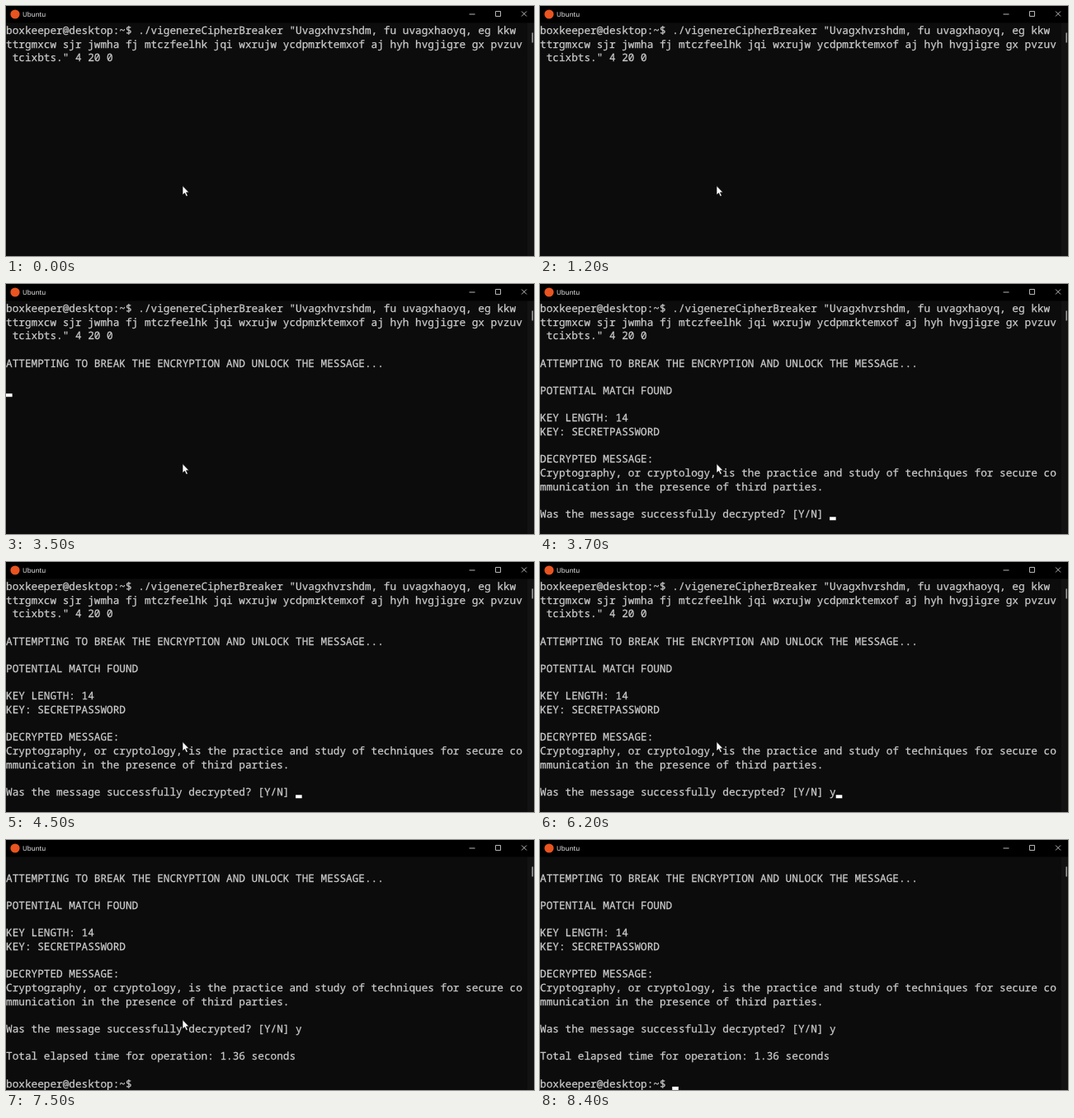
Animation, 640 px wide and 304 px high, one loop 9 s. Source, as an HTML page:

```html
<!DOCTYPE html>
<html lang="en">
<head>
<meta charset="utf-8">
<title>Terminal</title>
<style>
  html, body { margin: 0; height: 100%; overflow: hidden; background: #0c0c0c; }
  svg { display: block; width: 640px; height: 304px; }
  text { white-space: pre; text-rendering: geometricPrecision; }
  #screen { font: 12.72px "Noto Sans Mono", "DejaVu Sans Mono", monospace; fill: #ccc; stroke: #ccc; stroke-width: .25; }
  #title { font: 8px "Open Sans", "Noto Sans", sans-serif; fill: #fff; }
</style>
</head>
<body>
<svg viewBox="0 0 640 304">
  <rect width="640" height="304" fill="#0c0c0c"/>
  <rect x="632" y="20" width="8" height="284" fill="#121212"/>
  <rect x="637.4" y="32.5" width="1.6" height="12" fill="#9a9a9a"/>
  <g id="screen"></g>
  <rect id="cursor" width="7.6" height="4" fill="#fff"/>
  <rect width="640" height="20.5"/>
  <circle cx="11" cy="10" r="5.6" fill="#e95420"/>
  <text id="title" x="20" y="13">Ubuntu</text>
  <path d="M561.5 10h7M593.5 6.5h6v6h-6zM625 6.5l6 6m0-6l-6 6" fill="none" stroke="#ccc" stroke-width=".9"/>
  <path id="mouse" d="M214 218.5v11.3l2.6-2.3 1.9 4.1 1.9-.9-1.9-3.9h3.5z" fill="#fff" stroke="#000" stroke-width=".7"/>
</svg>
<script>
const LOOP = 9000, ROW = 16.67, COL = 7.632, TOP = 21.4;
const prompt = 'boxkeeper@desktop:~$ ';
const lines = [
  prompt + './vigenereCipherBreaker "Uvagxhvrshdm, fu uvagxhaoyq, eg kkw',
  'ttrgmxcw sjr jwmha fj mtczfeelhk jqi wxrujw ycdpmrktemxof aj hyh hvgjigre gx pvzuv',
  ' tcixbts." 4 20 0',
  '',
  'ATTEMPTING TO BREAK THE ENCRYPTION AND UNLOCK THE MESSAGE...',
  '',
  'POTENTIAL MATCH FOUND',
  '',
  'KEY LENGTH: 14',
  'KEY: SECRETPASSWORD',
  '',
  'DECRYPTED MESSAGE:',
  'Cryptography, or cryptology, is the practice and study of techniques for secure co',
  'mmunication in the presence of third parties.',
  '',
  'Was the message successfully decrypted? [Y/N] ',
  '',
  'Total elapsed time for operation: 1.36 seconds',
  '',
  prompt
];

// Output steps: start time, last line shown, first visible line
const steps = [[0, 2, 0], [1300, 3, 0], [1700, 6, 0], [3700, 15, 0], [6300, 19, 3]];
const answerAt = 6100, mouseGone = 8400, question = 15;
const cursorOff = [[0, 300], [1200, 1300], [2700, 3500], [5000, 5800], [7500, 8300]];

const $ = id => document.getElementById(id);
const rows = lines.map(() =>
  $('screen').appendChild(document.createElementNS('http://www.w3.org/2000/svg', 'text')));
const show = (el, on) => el.setAttribute('visibility', on ? 'visible' : 'hidden');

function draw(t) {
  const [, last, first] = steps.filter(s => s[0] <= t).pop();
  // The match line stays blank while the search is running
  const content = i => {
    if (i === 6 && last === 6) return '';
    return lines[i] + (i === question && t >= answerAt ? 'y' : '');
  };
  rows.forEach((el, i) => {
    el.textContent = content(i);
    el.setAttribute('y', TOP + 12.6 + (i - first) * ROW);
    show(el, i >= first && i <= last);
  });
  $('cursor').setAttribute('x', content(last).length * COL);
  $('cursor').setAttribute('y', TOP + 11.8 + (last - first) * ROW);
  show($('cursor'), !cursorOff.some(([a, b]) => t >= a && t < b));
  show($('mouse'), t < mouseGone);
}

const start = performance.now();
function tick() {
  draw((performance.now() - start) % LOOP);
  requestAnimationFrame(tick);
}
tick();
</script>
</body>
</html>
```
